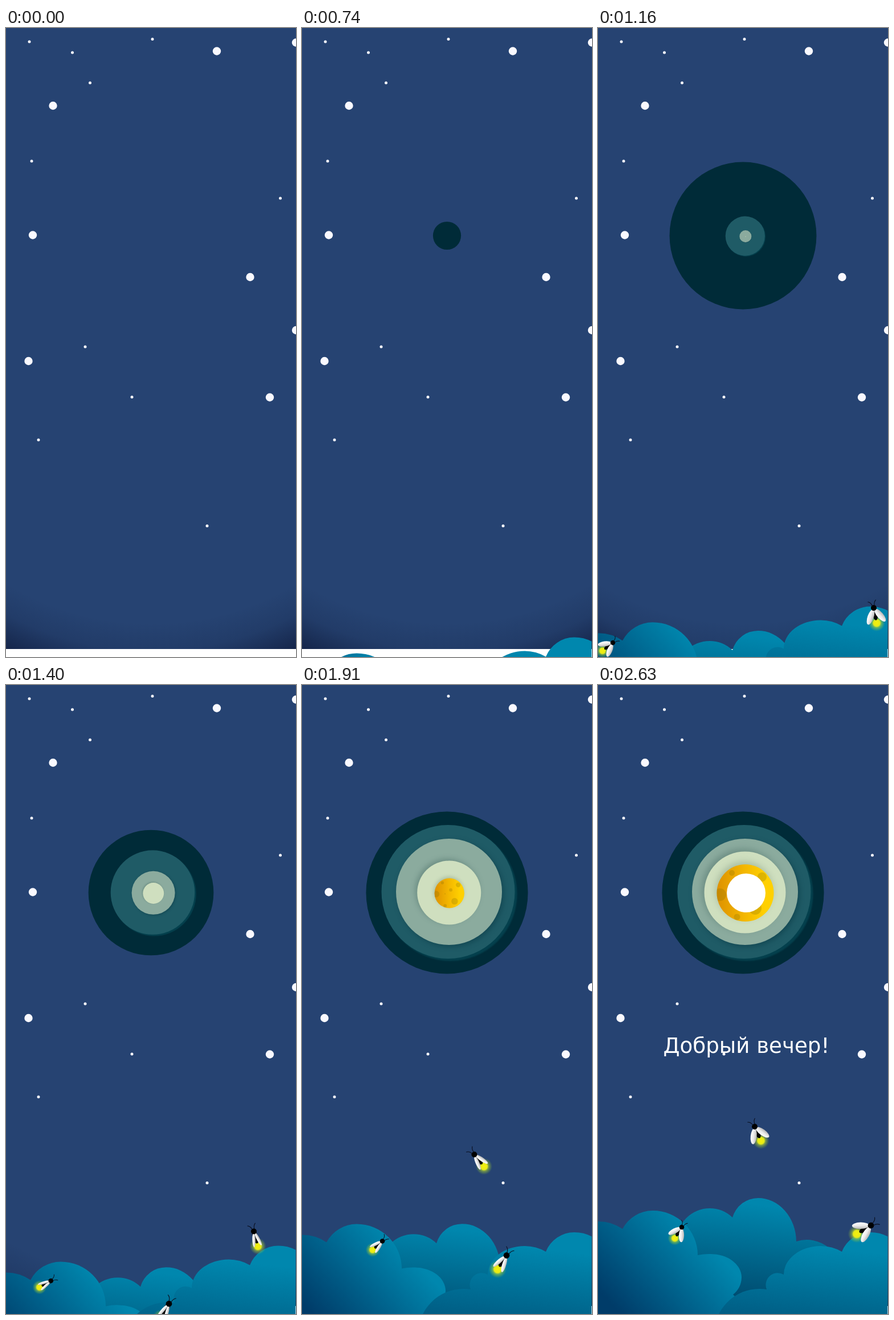
Write an HTML page that moves like this. It is 509 by 1101 pixels and loops after 3.1 s.

```html
<!DOCTYPE html>
<html lang="ru">
<head>
<meta charset="utf-8">
<title>Добрый вечер</title>
<style>
  html, body { margin: 0; width: 100%; height: 100%; overflow: hidden; background: #fff; }
  svg { display: block; width: 100vw; height: 100vh; }
  text { font: 37.2px "DejaVu Sans", "Noto Sans", sans-serif; fill: #fff; }
  #ring2 { filter: drop-shadow(4px 4px 1px #04404d); }
  #ring3 { filter: drop-shadow(3px 3px 5px rgba(0, 43, 56, .4)); }
  #ring4 { filter: drop-shadow(-4px -4px 6px rgba(50, 85, 80, .35)); }
  #disc { filter: drop-shadow(-2px -5px 6px rgba(100, 130, 105, .35)); }
</style>
</head>
<body>
<svg viewBox="0 0 509 1101" preserveAspectRatio="none">
  <defs>
    <radialGradient id="shade" gradientUnits="userSpaceOnUse" cx="255" cy="550" r="600">
      <stop offset=".82" stop-color="#0f1b3c" stop-opacity="0"/>
      <stop offset=".9" stop-color="#0f1b3c" stop-opacity=".18"/>
      <stop offset="1" stop-color="#0f1b3c" stop-opacity=".8"/>
    </radialGradient>
    <linearGradient id="left" gradientUnits="userSpaceOnUse" x1="170" y1="955" x2="30" y2="1090">
      <stop stop-color="#0087ae"/><stop offset="1" stop-color="#003c69"/>
    </linearGradient>
    <linearGradient id="back" gradientUnits="userSpaceOnUse" x1="290" y1="910" x2="270" y2="1080">
      <stop stop-color="#0087ae"/><stop offset="1" stop-color="#004a6e"/>
    </linearGradient>
    <linearGradient id="right" gradientUnits="userSpaceOnUse" x1="400" y1="985" x2="385" y2="1125">
      <stop stop-color="#0087ae"/><stop offset="1" stop-color="#005b82"/>
    </linearGradient>
    <linearGradient id="gold">
      <stop stop-color="#dd9100"/><stop offset=".5" stop-color="#f4b800"/><stop offset=".85" stop-color="#ffd000"/>
    </linearGradient>
    <radialGradient id="glow">
      <stop stop-color="#f6f00c"/><stop offset=".4" stop-color="#e6ea18"/>
      <stop offset=".56" stop-color="#b8d82c" stop-opacity=".55"/>
      <stop offset="1" stop-color="#8cc832" stop-opacity="0"/>
    </radialGradient>
    <linearGradient id="wing">
      <stop stop-color="#fff"/><stop offset=".5" stop-color="#ececec"/><stop offset="1" stop-color="#b4b4b4"/>
    </linearGradient>
    <clipPath id="moonEdge"><circle cx="-.5" cy="-1" r="50"/></clipPath>
    <clipPath id="cloudEdge"><path d="M0 0H508.3V1101H0z"/></clipPath>
    <clipPath id="wipe"><rect id="wipeBox" width="509" height="60"/></clipPath>
    <g id="fly">
      <circle cy="27" r="14.5" fill="url(#glow)"/>
      <ellipse cy="10" rx="4.6" ry="12"/>
    </g>
    <ellipse id="wingShape" cy="17" rx="5.4" ry="14" fill="url(#wing)"/>
    <g id="head">
      <circle r="5"/>
      <path d="M-2 -4Q-3 -10 -8 -12M2 -4Q2 -10 6 -13" fill="none" stroke="#0b1020" stroke-width="1.1" stroke-linecap="round"/>
    </g>
  </defs>

  <path fill="#264372" d="M0 0H509V1087H0z"/>
  <path fill="url(#shade)" d="M0 940H509V1087H0z"/>
  <g id="stars" fill="#f9f9ff"></g>

  <circle id="ring1" r="142" fill="#002b38"/>
  <circle id="ring2" cx="-2.5" cy="-3" r="117" fill="#1f5b66"/>
  <circle id="ring3" cx="-1" cy="-3" r="93" fill="#8bab9e"/>
  <circle id="ring4" cx="-1" cy="-2" r="71.5" fill="#cfdfbf"/>
  <g id="moon">
    <circle id="disc" cx="-.5" cy="-1" r="50" fill="url(#gold)"/>
    <g clip-path="url(#moonEdge)" fill="#7d6a00" fill-opacity=".25">
      <circle cx="-45" cy="2" r="11"/><circle cx="-24" cy="-36" r="5"/><circle cx="29" cy="-29" r="8"/>
      <circle cx="4" cy="-12" r="5.5"/><circle cx="-15" cy="1" r="1.8"/>
      <circle cx="17" cy="26" r="11"/><circle cx="-15" cy="41" r="5.5"/>
    </g>
  </g>
  <circle id="badge" cx="260" cy="364" r="34" fill="#fff"/>

  <g clip-path="url(#wipe)"><text x="114.5" y="644">Добрый вечер!</text></g>

  <g clip-path="url(#cloudEdge)">
    <path id="cloudBack" fill="url(#back)" d="M138 1400V974A58 58 0 0 1 196 916A58 58 0 0 1 236 932
      A47 47 0 0 1 281 898A67 77 0 0 1 348 974A60 60 0 0 1 405 985L430 1400z"/>
    <path id="cloudLeft" fill="url(#left)" d="M-40 1400V950A75 75 0 0 1 0 939A75 75 0 0 1 43 952
      A60 60 0 0 1 96 920A79 78 0 0 1 175 998A90 90 0 0 1 198 996A54 41 0 0 1 252 1037
      A40 40 0 0 1 237 1067L270 1100V1400z"/>
    <path id="cloudRight" fill="url(#right)" d="M204 1400V1136A79 79 0 0 1 283 1057A79 79 0 0 1 296 1058
      A21 21 0 0 1 326 1032A65 50 0 0 1 391 982A73 73 0 0 1 428 992A54 54 0 0 1 478 958
      A68 68 0 0 1 510 966L520 970V1400z"/>
  </g>
  <g id="flies"></g>
</svg>

<script>
const LOOP = 3100, START = 500, END = 2630, STEP = 30;
const $ = id => document.getElementById(id);
const place = (node, value) => node.setAttribute('transform', value);
const clamp = v => Math.min(1, Math.max(0, v));
const ramp = (t, from, to) => clamp((t - from) / (to - from));

const dots = (r, points) => points.split(' ').map(p => {
  const [x, y] = p.split(',');
  return `<circle cx="${x}" cy="${y}" r="${r}"/>`;
}).join('');
$('stars').innerHTML =
  dots(2.5, '41,24 116.5,43 257,19.5 147.5,96 45,233 481.5,298 139,558 221,646 57,721 353,871.5') +
  dots(7.2, '370,40.5 82.5,136 47,362.5 428.5,436 509,25.5 509,529 39.5,583 463,646.5');

// Grows past full size, shrinks, then grows back.
const pulse = t => Math.min(ramp(t, 678, 1043) * 1.02, .74 + .00084 * Math.abs(Math.min(t, 1670) - 1360));

const grow = {
  ring2: t => ramp(t, 948, 1665),
  ring3: t => ramp(t, 1068, 1880),
  ring4: t => ramp(t, 1150, 2120),
  moon: t => ramp(t, 1450, 2330)
};

// Clouds rise at a steady speed (px/ms) until they arrive.
const clouds = [
  { id: 'cloudBack', speed: .149, stop: 2213 },
  { id: 'cloudLeft', speed: .129, stop: 2093 },
  { id: 'cloudRight', speed: .129, stop: 1582 }
];

// Bezier points are [x, y, heading].
const flies = [
  { size: .85, from: 1160, to: 2090, curve: [[26, 1076, 52], [104, 1033, 68], [144, 991, 66], [147, 949, 32]] },
  { size: 1, from: 1160, to: 2090, curve: [[484, 1015, -11], [440, 942, 0], [304, 857, -70], [275, 773, -24]] },
  { size: 1.07, from: 1400, to: 2520, curve: [[286, 1083, 28], [316, 1004, 13], [412, 966, 52], [479, 946, 59]] }
];

$('flies').innerHTML = flies.map(() => `<g><use href="#fly"/><g class="wings">
  <use href="#wingShape" transform="rotate(30)"/><use href="#wingShape" transform="rotate(-30)"/>
  </g><use href="#head"/></g>`).join('');
flies.forEach((fly, i) => {
  fly.node = $('flies').children[i];
  fly.wings = fly.node.querySelector('.wings');
});

// Before its start the curve carries on along its first tangent.
function along([a, b, c, d], u) {
  const v = 1 - u;
  return a.map((p, i) => u < 0 && i < 2
    ? p + 3 * u * (b[i] - p)
    : v * v * v * p + 3 * v * v * u * b[i] + 3 * v * u * u * c[i] + u * u * u * d[i]);
}

function draw(t) {
  place($('ring1'), `translate(254.5 363.5) scale(${pulse(t)})`);
  for (const id in grow) place($(id), `translate(259 365) scale(${grow[id](t)})`);
  $('badge').style.opacity = ramp(t, 2330, END);

  for (const { id, speed, stop } of clouds) place($(id), `translate(0 ${speed * Math.max(0, stop - t)})`);
  $('wipeBox').setAttribute('y', 657 - 49 * ramp(t, 2090, 2270));

  const open = 1 - .75 * Math.sin(Math.PI * ramp(t, 1160, 2090));
  for (const { size, from, to, curve, node, wings } of flies) {
    const [x, y, turn] = along(curve, Math.min(1, (t - from) / (to - from)));
    place(node, `translate(${x} ${y}) rotate(${turn}) scale(${size})`);
    place(wings, `scale(${open} 1)`);
  }
}

const t0 = performance.now();
function tick(now) {
  const t = Math.max(0, now - t0) % LOOP;
  draw(t < START ? 0 : Math.min(END, START + STEP * Math.floor((t - START) / STEP)));
  requestAnimationFrame(tick);
}
draw(0);
requestAnimationFrame(tick);
</script>
</body>
</html>
```
